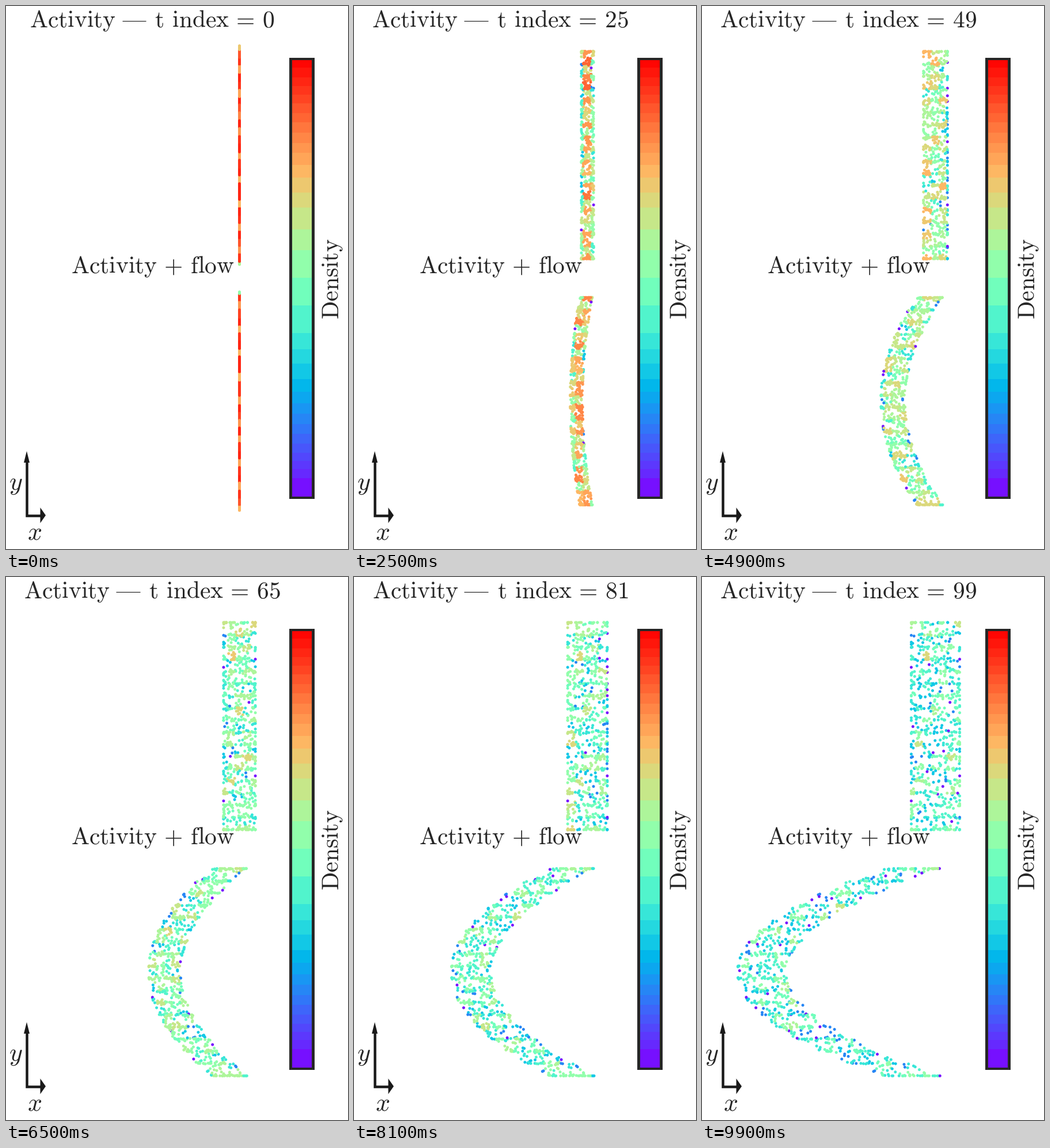
Recreate the animation shown at these times as a matplotlib script. Size 594 px wide and 943 px high, loop 10 s.

```python
import numpy as np
import matplotlib.pyplot as plt
from matplotlib.animation import FuncAnimation
from matplotlib.colors import BoundaryNorm, ListedColormap
from matplotlib.patches import Polygon, Rectangle

W, H, DPI = 594, 943, 64
PT = 72 / DPI                      # points per pixel
FRAMES = 100
INK = "#262626"
EM = 41.5                          # text size in pixels

plt.rcParams["mathtext.fontset"] = "cm"
plt.rcParams["text.hinting"] = "none"

fig = plt.figure(figsize=(W / DPI, H / DPI), dpi=DPI, facecolor="white")
ax = fig.add_axes([0, 0, 1, 1])
ax.set_xlim(0, W)
ax.set_ylim(H, 0)
ax.axis("off")


def label(x, y, tex, size=EM, **kw):
    return ax.text(x, y, f"${tex}$", fontsize=size * PT, color=INK,
                   va="baseline", zorder=5, **kw)


# Banded rainbow scale, shared by the bar and the dots
TOP, BOTTOM = 94, 852
edges = np.array([94, 107, 124, 139, 154, 169, 186, 202, 220, 238, 255, 276,
                  298, 324, 350, 388, 424, 472, 520, 568, 596, 621, 648, 670,
                  690, 708, 726, 743, 760, 776, 790, 804, 820, 852])
levels = ((BOTTOM - edges) / (BOTTOM - TOP))[::-1]
cmap = ListedColormap(plt.get_cmap("rainbow")((levels[1:] + levels[:-1]) / 2))
norm = BoundaryNorm(levels, cmap.N)

ax.add_patch(Rectangle((492, 89.5), 43.5, 766.5, fc=INK, lw=0))
for i, (y0, y1) in enumerate(zip(edges[:-1], edges[1:])):
    ax.add_patch(Rectangle((497, y0), 34, y1 - y0, fc=cmap(cmap.N - 1 - i),
                           lw=0, antialiased=False))
label(577.5, 473.5, r"\mathrm{Density}", rotation=90, ha="center",
      rotation_mode="anchor")

# Axis arrows
ARROW = "#1a1a1a"
ax.plot([36, 36, 61], [790, 884.5, 884.5], color=ARROW, lw=4.5 * PT,
        solid_capstyle="butt", solid_joinstyle="miter")
ax.add_patch(Polygon([(36, 773), (31, 793), (41, 793)], fc=ARROW, lw=0))
ax.add_patch(Polygon([(69, 884.5), (59.5, 871), (59.5, 898)], fc=ARROW, lw=0))
label(16.5, 840, "y", 44, ha="center")
label(49.5, 926.5, "x", 44, ha="center")

# Titles; the long dash is a rule set into a gap of the heading
TITLE = r"\mathrm{Activity\hspace{1.9}t\hspace{0.38}index\,=\,%d}"
title = label(254, 37, TITLE % 0, ha="center")
dash, = ax.plot([], [], color=INK, lw=1.2 * PT, solid_capstyle="butt")
label(113, 464.5, r"\mathrm{Activity\,+\,flow}")

# Particles: a spreading strip above, a strip carried by a parabolic flow below
N = 840
X0 = 405.5
REACH, LIMIT, FLOW_HALF = 190, 180, 193
SPREAD, DRIFT = 0.4245, 0.03076
BIN, MAX_COUNT = 13.67, 46
rng = np.random.default_rng(7)


def scatter_evenly(reach):
    """Random values in [-reach, reach] with one value per equal slot."""
    slots = rng.permutation(N) + rng.random(N)
    return reach * (2 * slots / N - 1)


class Strip:
    def __init__(self, yc, drift):
        self.yc, self.drift = yc, drift
        self.u = np.clip(scatter_evenly(1.14), -1, 1)
        self.v = scatter_evenly(REACH)
        self.inside = np.clip(self.v, -LIMIT, LIMIT)
        flow_y = self.inside + 0.25 * (self.v - self.inside)
        self.profile = 1 - (flow_y / FLOW_HALF) ** 2
        # a little crowding along the strip
        wave = 2 * np.pi * self.v / REACH
        self.v = self.v + 3 * np.sin(9 * wave) * (np.abs(self.v) < LIMIT)
        self.inside = np.clip(self.v, -LIMIT, LIMIT)
        self.dots = ax.scatter(np.full(N, X0), yc + self.v, c=np.zeros(N),
                               s=(5 * PT) ** 2, lw=0, cmap=cmap, norm=norm,
                               zorder=3)

    def update(self, k):
        x = X0 + SPREAD * k * self.u - self.drift * k * k * self.profile
        y = self.yc + (self.inside if k else self.v)
        self.dots.set_offsets(np.column_stack([x, y]))
        self.dots.set_array(density(x, y))


def density(x, y):
    """Log-scaled number of particles sharing each particle's grid cell."""
    col = np.floor((x - 398) / BIN).astype(int)
    row = np.floor((y - 76) / BIN).astype(int)
    _, cell, count = np.unique(col * 1000 + row, return_inverse=True,
                               return_counts=True)
    return np.clip(np.log(count[cell]) / np.log(MAX_COUNT), 0, 0.999)


strips = [Strip(259, 0), Strip(686.3, DRIFT)]


def draw(k):
    title.set_text(f"${TITLE % k}$")
    left = 201.5 if k < 10 else 201.5 - EM / 4
    dash.set_data([left, left + EM], [26, 26])
    for strip in strips:
        strip.update(k)
    return [title, dash] + [s.dots for s in strips]


anim = FuncAnimation(fig, draw, frames=FRAMES, interval=100, repeat=True,
                     repeat_delay=0, blit=False)
plt.show()
```
